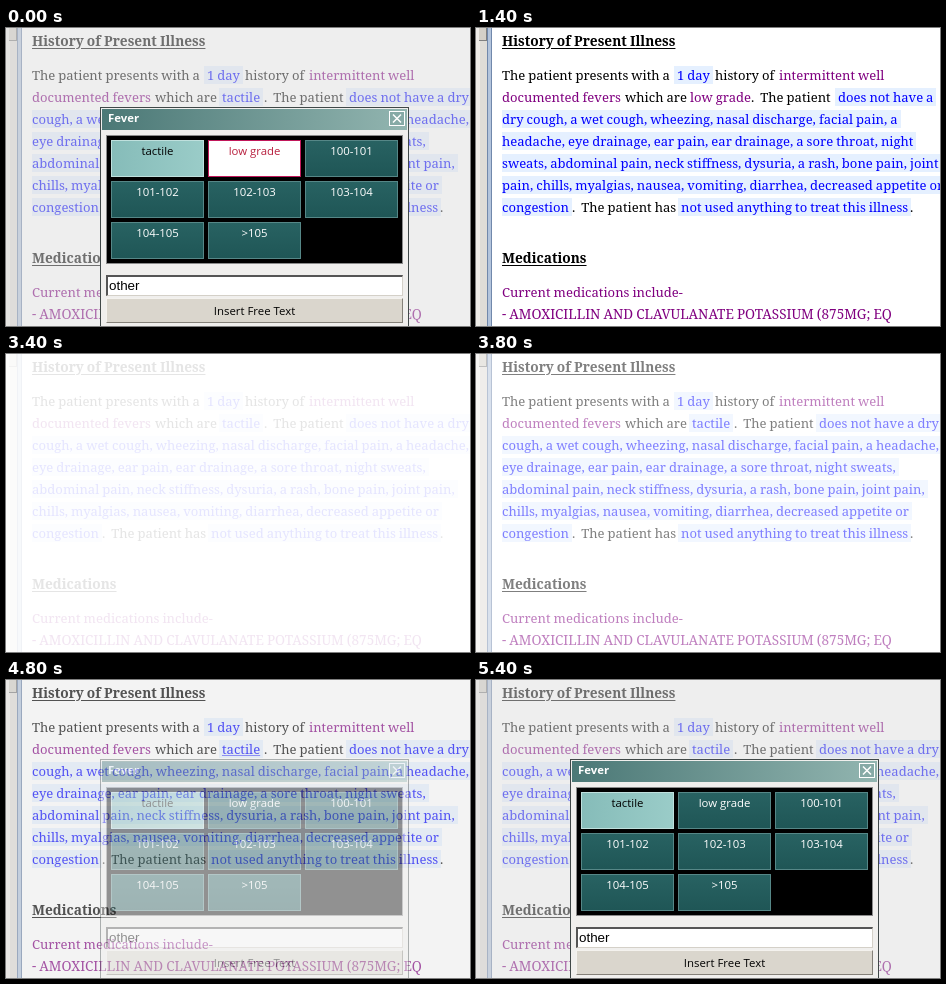
Write an HTML page that moves like this. It is 464 px wide and 298 px high and loops after 6.4 s.

```html
<!DOCTYPE html>
<html lang="en">
<head>
<meta charset="utf-8">
<title>Fever picker</title>
<style>
html, body { margin: 0; width: 100%; height: 100%; overflow: hidden; background: #fff; }
#stage { position: absolute; left: 0; top: 0; width: 464px; height: 298px; overflow: hidden; background: #fff; }
.layer { position: absolute; inset: 0; overflow: hidden; will-change: opacity; }
.layer * { position: absolute; box-sizing: border-box; white-space: pre; }
.note { background: #fff; }
.veil { background: rgba(221, 221, 221, .5); }
.run { font: 13.05px/18px "Noto Serif", serif; word-spacing: -.03em; color: #000; }
.head { font-size: 13.7px; font-weight: 700; text-decoration: underline; text-underline-offset: 2px; }
.plum { color: #800080; }
.caps { font-size: 13.5px; }
.link { color: #00f; background: #e5f0ff; padding: 0 3px; margin-left: -3px; }
.full { padding-left: 0; margin-left: 0; }
.hover { text-decoration: underline; }
.track { left: 0; top: 0; width: 11px; height: 298px; background: linear-gradient(90deg, #eeece8 4px, #dfdcd7 4px); }
.thumb { left: 3px; top: -4px; width: 8px; height: 17px; background: #d4d0c8; border: solid #808080; border-width: 0 1px 1px 0; }
.edge { left: 11px; top: 0; width: 5px; height: 298px; background: #b3c4dc; border: solid; border-width: 0 1px; border-color: #9a9a9a #7188ab; }
.dialog { left: 94px; top: 79px; width: 309px; height: 230px; background: #f0efed; border: 1px solid #404848; font: 11.4px/16px "Open Sans", sans-serif; }
.dialog > * { margin: -80px 0 0 -95px; }
.bar { background: linear-gradient(90deg, #4b7876, #92b5b0); }
.title { color: #fff; font-weight: 700; }
.close { border: 1px solid #fff; background: #86aaa6; }
.panel { background: #000; border: 1px solid #8b8b8b; }
.cell { background: linear-gradient(#286262, #1f5656); border: 1px solid #568787; color: #fff; text-align: center; padding-top: 2px; }
.picked { background: linear-gradient(90deg, #86bcb9, #9accc8); border-color: #bfe0dd; color: #000; }
.hot { background: #fff; border-color: #c2185b; color: #b8203f; }
.input { background: #fff; border: solid; border-width: 2px 1px 1px 2px; border-color: #555 #d4d0c8 #d4d0c8 #555; font: 13.4px/18px "Liberation Sans", Arial, sans-serif; padding-left: 1px; color: #000; }
.button { background: #dad6cd; border: 1px solid #f4f2ee; border-right-color: #858179; border-bottom-color: #858179; text-align: center; line-height: 23px; color: #000; }
</style>
</head>
<body>
<div id="stage"></div>
<script>
const stage = document.getElementById('stage');

function add(parent, cls, text = '') {
  const el = document.createElement('div');
  el.className = cls;
  el.textContent = text;
  return parent.appendChild(el);
}

function box(parent, cls, x, y, w, h, text) {
  const el = add(parent, cls, text);
  el.style.cssText = `left:${x}px;top:${y}px;width:${w}px;height:${h}px`;
  return el;
}

const LINE = 22, FIRST = 52;

const finding = {
  tactile: {
    x: 216, rest: [258, 343], start: 'does not have a dry', cls: 'link',
    lines: [
      'cough, a wet cough, wheezing, nasal discharge, facial pain, a headache,',
      'eye drainage, ear pain, ear drainage, a sore throat, night sweats,',
      'abdominal pain, neck stiffness, dysuria, a rash, bone pain, joint pain,',
      'chills, myalgias, nausea, vomiting, diarrhea, decreased appetite or'
    ]
  },
  'low grade': {
    x: 214, rest: [275, 362], start: 'does not have a', cls: 'plum',
    lines: [
      'dry cough, a wet cough, wheezing, nasal discharge, facial pain, a',
      'headache, eye drainage, ear pain, ear drainage, a sore throat, night',
      'sweats, abdominal pain, neck stiffness, dysuria, a rash, bone pain, joint',
      'pain, chills, myalgias, nausea, vomiting, diarrhea, decreased appetite or'
    ]
  }
};

function note(term, hover = '') {
  const page = add(stage, 'layer note');
  const run = (x, base, text, cls = '') => {
    const el = add(page, 'run ' + cls, text);
    el.style.left = x + 'px';
    el.style.top = base - 14 + 'px';
  };
  const f = finding[term];
  const row = i => FIRST + LINE * i;

  ['track', 'thumb', 'edge'].forEach(c => add(page, c));
  run(26, 18, 'History of Present Illness', 'head');

  run(26, row(0), 'The patient presents with a');
  run(201, row(0), '1 day', 'link');
  run(239, row(0), 'history of');
  run(303, row(0), 'intermittent well', 'plum');

  run(26, row(1), 'documented fevers', 'plum');
  run(149, row(1), 'which are');
  run(f.x, row(1), term, f.cls + hover);
  run(f.rest[0], row(1), '.  The patient');
  run(f.rest[1], row(1), f.start, 'link');

  f.lines.forEach((s, i) => run(26, row(i + 2), s, 'link full'));

  run(26, row(6), 'congestion', 'link full');
  run(96, row(6), '.  The patient has');
  run(205, row(6), 'not used anything to treat this illness', 'link');
  run(434, row(6), '.');

  run(26, 235, 'Medications', 'head');
  run(26, 269, 'Current medications include-', 'plum');
  run(26, 291, '- AMOXICILLIN AND CLAVULANATE POTASSIUM (875MG; EQ', 'plum caps');
  return page;
}

function picker() {
  const layer = add(stage, 'layer');
  const d = add(layer, 'dialog');
  box(d, 'bar', 96, 81, 305, 21);
  box(d, 'title', 102, 82, 80, 16, 'Fever');
  const close = box(d, 'close', 383, 83, 16, 15);
  close.innerHTML = '<svg width="14" height="13" style="left:0;top:0"><path d="M3 2.5l8 8m0-8l-8 8" stroke="#fff" stroke-width="1.5"/></svg>';
  box(d, 'panel', 100, 107, 297, 129);
  const names = ['tactile', 'low grade', '100-101', '101-102', '102-103', '103-104', '104-105', '>105'];
  const cells = names.map((s, i) =>
    box(d, 'cell', 105 + i % 3 * 97, 112 + Math.floor(i / 3) * 41, 93, 37, s));
  cells[0].classList.add('picked');
  box(d, 'input', 100, 247, 297, 21, 'other');
  box(d, 'button', 100, 270, 297, 25, 'Insert Free Text');
  return { layer, low: cells[1] };
}

// Stacked from back to front.
const before = note('tactile');
const hovered = note('tactile', ' hover');
const after = note('low grade');
const veil = add(stage, 'layer veil');
const dialog = picker();

const LOOP = 6400, STEP = 100;

// Ten even steps; the first one already shows.
function fade(t, start) {
  const n = Math.floor((t - start) / STEP) + 1;
  return Math.max(0, Math.min(1, n / 10));
}

function draw(t) {
  const closing = t < 2400;
  const shown = closing ? 1 - Math.sqrt(fade(t, 500)) : fade(t, 4500);
  const blank = t >= 2400 && t < 3400;
  before.style.opacity = closing ? 1 : blank ? 0 : fade(t, 3400);
  hovered.style.opacity = t >= 4400 ? 1 - shown : 0;
  after.style.opacity = closing ? 1 - shown : 0;
  // The page dims ahead of the dialog and clears behind it.
  veil.style.opacity = Math.cbrt(shown);
  dialog.layer.style.opacity = shown;
  dialog.low.classList.toggle('hot', closing);
}

const t0 = performance.now();
function tick() {
  draw((performance.now() - t0) % LOOP);
  requestAnimationFrame(tick);
}
tick();
</script>
</body>
</html>
```
